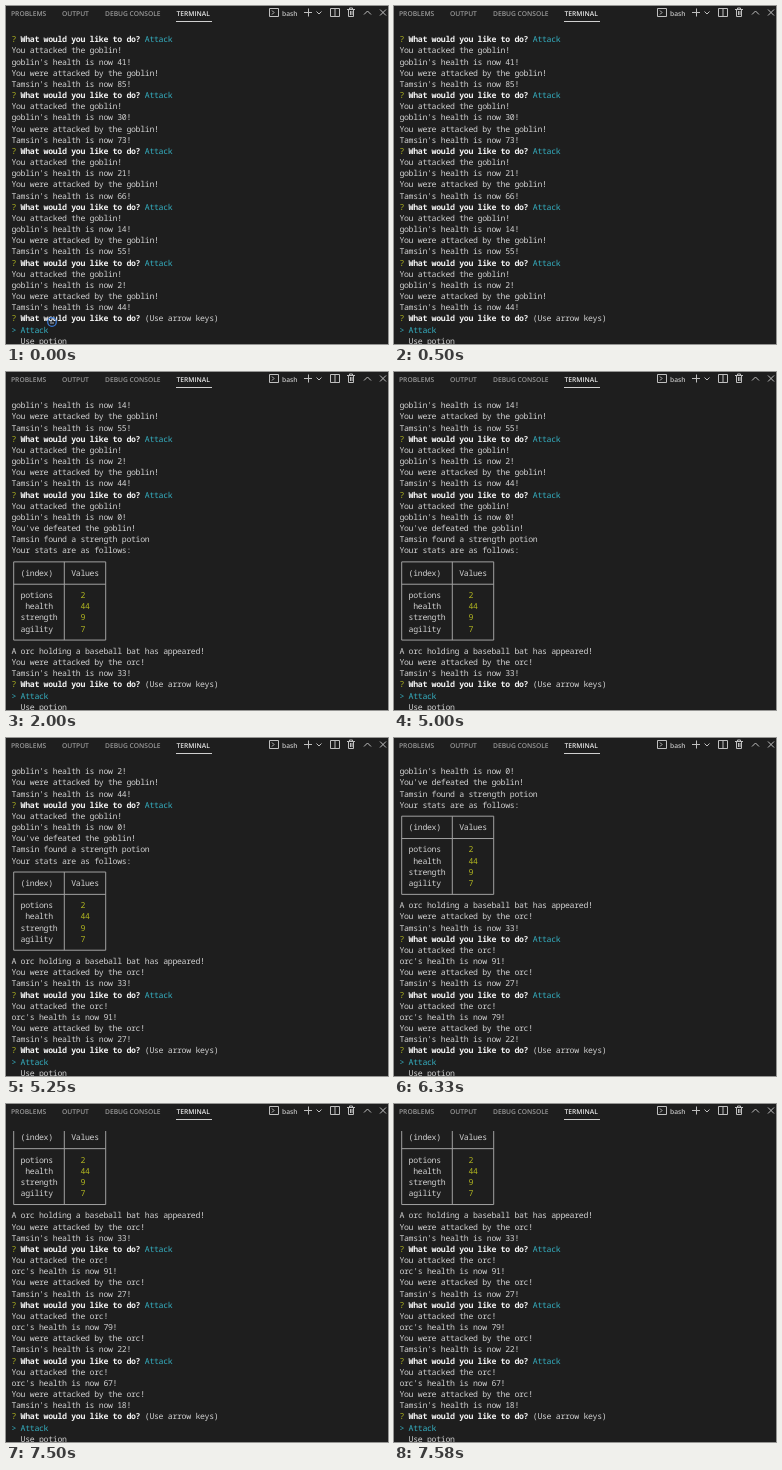
An HTML page with a canvas that plays this animation: 382 by 338 pixels, repeating every 8 s.

```html
<!DOCTYPE html>
<html lang="en">
<head>
<meta charset="utf-8">
<title>Terminal battle</title>
<style>
html, body { margin: 0; width: 100%; height: 100%; overflow: hidden; background: #1e1e1e; }
canvas { display: block; width: 382px; height: 338px; }
</style>
</head>
<body>
<canvas id="stage" width="382" height="338"></canvas>
<script>
const ctx = document.getElementById('stage').getContext('2d');
const LOOP = 8000, LEFT = 5.4, CELL = 4.6, TOP = 33.5, ROW = 11.17;
const MONO = '8.2px "Noto Sans Mono", "DejaVu Sans Mono", monospace';
const SANS = '600 6.7px "Open Sans", "Noto Sans", sans-serif';
const BG = '#1e1e1e', TEXT = '#d2d2d2', BRIGHT = '#f4f4f4', OLIVE = '#b0b520', CYAN = '#35b0c2';
const ICON = '#c0c0c0', TAB = '#9a9a9a', FRAME = '#a0a0a0';
const HERO = 'Tamsin';

// A line is a list of pieces: [column, text, colour, bold]
const plain = s => [[0, s, TEXT]];
const question = tail => [[0, '?', OLIVE], [2, 'What would you like to do?', BRIGHT, true], tail];
const asked = question([29, 'Attack', CYAN]);
const menu = [
  question([29, '(Use arrow keys)', TEXT]),
  [[0, '>', CYAN], [2, 'Attack', CYAN]],
  plain('  Use potion')
];

const log = [];
const say = (...lines) => lines.forEach(s => log.push(plain(s)));
const wounded = (foe, hp) => say(`You were attacked by the ${foe}!`, `${HERO}'s health is now ${hp}!`);
const strike = (foe, hp) => {
  log.push(asked);
  say(`You attacked the ${foe}!`, `${foe}'s health is now ${hp}!`);
};
const fight = (foe, rounds) => rounds.forEach(([foeHp, hp]) => {
  strike(foe, foeHp);
  wounded(foe, hp);
});

fight('goblin', [[41, 85], [30, 73], [21, 66], [14, 55], [2, 44]]);
strike('goblin', 0);
say("You've defeated the goblin!", `${HERO} found a strength potion`, 'Your stats are as follows:');
const tableRow = log.length;
say('', '  (index)    Values', '');
[['potions', 2], [' health', 44], ['strength', 9], ['agility', 7]].forEach(([key, value]) =>
  log.push([[2, key, TEXT], [15, String(value), OLIVE]]));
say('', 'A orc holding a baseball bat has appeared!');
wounded('orc', 33);
fight('orc', [[91, 27], [79, 22], [67, 18]]);

// [start, log line of the open question, first visible line]
const screens = [[0, 25, 0], [1920, 42, 17], [5250, 47, 22], [6330, 52, 27], [7420, 57, 31], [7500, 57, 32]];
// [start, x, y]
const pointer = [[0, 46, 316], [80, 52, 321], [170, 56, 326], [330, 100, 333], [415, 360, 333], [500, -20, -20]];
const at = (steps, t) => steps.findLast(s => s[0] <= t);

function stroke(d, color = ICON, width = 1) {
  ctx.strokeStyle = color;
  ctx.lineWidth = width;
  ctx.stroke(new Path2D(d));
}

function label(s, x, color) {
  ctx.font = SANS;
  ctx.fillStyle = color;
  ctx.fillText(s, x, 9.5);
}

function drawHeader() {
  label('PROBLEMS', 5, TAB);
  label('OUTPUT', 56, TAB);
  label('DEBUG CONSOLE', 99, TAB);
  label('TERMINAL', 170.5, '#e7e7e7');
  label('bash', 276, ICON);
  stroke('M170 15.5H206', '#d0d0d0');
  stroke('M263.5 2.5h9v8h-9zM266 4.5l2 2l-2 2');
  stroke('M298 6.5h8M302.5 2.5v8');
  stroke('M310.5 5.5l2.5 2.5l2.5-2.5');
  stroke('M324.5 2.5h9v8h-9zM329 2.5v8');
  stroke('M341 3.5h8M343.5 3V2h3v1M342.5 4v6.5h5V4M344.5 5v4M346 5v4');
  stroke('M358 8.5l3.5-3.5l3.5 3.5');
  stroke('M374 3.5l6 6M380 3.5l-6 6');
}

function drawLine(line, row) {
  for (const [col, s, color, bold] of line) {
    ctx.font = (bold ? 'bold ' : '500 ') + MONO;
    ctx.fillStyle = color;
    [...s].forEach((c, i) => ctx.fillText(c, LEFT + (col + i) * CELL, TOP + 2.7 + row * ROW));
  }
}

function drawTable(row) {
  const x = col => LEFT + (col + 0.5) * CELL;
  const y = n => TOP + (row + n) * ROW;
  stroke(`M${x(0)} ${y(0)}H${x(20)}V${y(7)}H${x(0)}ZM${x(11)} ${y(0)}V${y(7)}M${x(0)} ${y(2)}H${x(20)}`, FRAME);
}

function drawPointer(x, y) {
  ctx.beginPath();
  ctx.arc(x, y, 4.3, 0, 7);
  ctx.strokeStyle = '#3b78d0';
  ctx.lineWidth = 1.3;
  ctx.stroke();
  stroke(`M${x - 1} ${y - 2}v4M${x + 1} ${y}v2`, '#b8c8e0', 0.9);
}

function draw(t) {
  const [, open, first] = at(screens, t);
  ctx.textRendering = 'geometricPrecision';
  ctx.fillStyle = BG;
  ctx.fillRect(0, 0, 382, 338);
  drawHeader();

  ctx.save();
  ctx.beginPath();
  ctx.rect(0, 27, 382, 311);
  ctx.clip();
  [...log.slice(0, open), ...menu].slice(first, first + 28).forEach(drawLine);
  if (open > tableRow) drawTable(tableRow - first);
  ctx.restore();

  const [, x, y] = at(pointer, t);
  drawPointer(x, y);
}

const start = performance.now();
function tick() {
  draw((performance.now() - start) % LOOP);
  requestAnimationFrame(tick);
}
tick();
</script>
</body>
</html>
```
